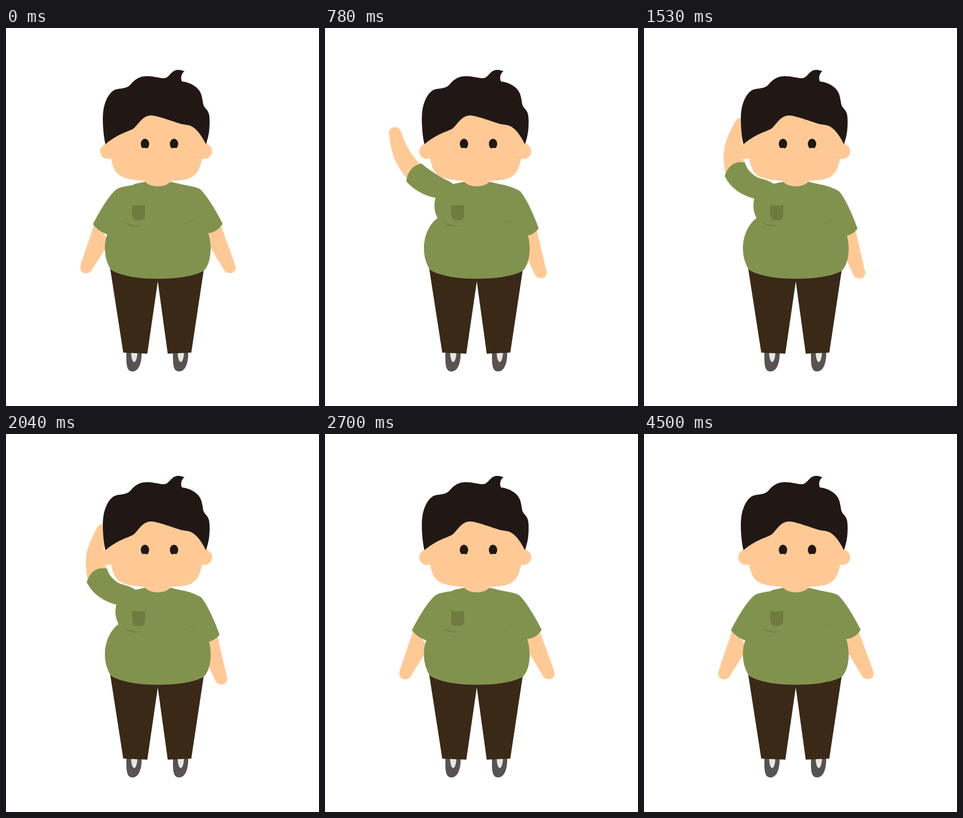
An HTML page without scripts for the animation above (4.53 s loop, 598x722 px).

```html
<!DOCTYPE html>
<html lang="en">
<head>
<meta charset="utf-8">
<title>Scratching his head</title>
<style>
html, body { margin: 0; width: 100%; height: 100%; overflow: hidden; background: #fff; }
svg { display: block; width: 598px; height: 722px; }
.skin { fill: #ffc996; }
.shirt { fill: #81924f; }
.shade { fill: #6f7b41; }
.hair { fill: #211815; }
.pants { fill: #3a2917; }
.shoe { fill: #585350; }
.tongue { fill: #e6e6e4; }

.shoulder, .bend, .eyes { animation: 4.53s linear infinite; }
.shoulder { animation-name: lift; transform-origin: var(--pivot); }
.left { --pivot: 241px 322px; --lift: 87.4deg; }
.right { --pivot: 335px 330px; --lift: 7deg; }

/* the elbow folds once the upper arm is level */
.bend { animation-name: bend; transform-origin: 186px 387px; d: var(--straight); }
.fore {
  --fold: 74deg;
  --straight: path("M172 366C163 392 152 424 143 451C137 472 159 473 165 461C173 447 185 430 197 410Z");
  --bent: path("M163 382C167 418 159 433 140 456C129 468 146 485 157 473C188 443 201 428 206 380Z");
}
.sleeve {
  --fold: 0deg;
  --straight: path("M243 300C228 302 216 304 210 309C195 322 178 351 166 375C176 387 189 395 206 397C216 382 226 366 233 352Z");
  --bent: path("M225 304C209 322 208 333 204 343C198 355 186 365 174 367C169 385 178 400 198 407C222 397 237 375 244 351Z");
}
.eyes { animation-name: blink; transform-origin: 293px 222px; }

@keyframes lift {
  0%, 59.6%, 100% { transform: rotate(0deg); }
  6.62% { transform: rotate(0deg); animation-timing-function: cubic-bezier(.3, 0, .5, 1); }
  19.87% { transform: rotate(var(--lift)); }
  46.36% { transform: rotate(var(--lift)); animation-timing-function: cubic-bezier(.5, 0, .7, 1); }
}
@keyframes bend {
  0%, 12.8%, 53.2%, 100% { d: var(--straight); transform: rotate(0deg); }
  19.87%, 46.36% { d: var(--bent); transform: rotate(var(--fold)); }
  12.8%, 46.36% { animation-timing-function: cubic-bezier(.33, 0, .67, 1); }
}
@keyframes blink {
  0%, 74.17%, 84.1%, 100% { transform: scaleY(1); }
  78.15%, 80.13% { transform: scaleY(.1); }
}
</style>
</head>
<body>
<svg viewBox="0 0 598 722">
  <defs>
    <g id="shoe">
      <path class="shoe" d="M230 618H259C260 636 255 656 242 656C229 656 230 640 230 618Z"/>
      <path class="tongue" d="M239 618H251C251 630 248 638 245 638C241 638 239 628 239 618Z"/>
    </g>
    <g id="eye">
      <ellipse class="hair" cx="265.5" cy="221.5" rx="8" ry="10"/>
      <ellipse class="skin" cx="264.5" cy="233" rx="8" ry="4"/>
    </g>
  </defs>

  <use href="#shoe"/>
  <use href="#shoe" x="89"/>
  <path class="pants" d="M199 459L224 620L270 622L290 484L309 622L354 620L378 461Z"/>

  <g class="shoulder left">
    <path class="skin bend fore"/>
    <path class="shirt bend sleeve"/>
  </g>
  <g class="shoulder right">
    <path class="skin" d="M383 380L391 420L417 463Q420 468 428 468C437 468 441 460 438 453L410 376Z"/>
    <path class="shirt" d="M335 299C351 302 363 303 371 308C384 320 402 350 414 374C408 384 398 391 385 392L360 380Z"/>
  </g>

  <path class="shirt" d="M264 294H316C335 299 352 301 360 306C371 315 371 345 365 363C385 378 391 400 391 421C391 440 386 458 376 465C355 475 325 479 290 479C255 479 225 475 202 463C193 452 189 436 189 421C189 396 200 374 215 363C208 350 208 335 211 325L245 298Z"/>
  <path class="shade" d="M241 338Q253 340 266 338V355C266 364 262 367 254 367C244 367 242 364 241 355Z"/>
  <path class="shade" d="M225 370Q240 378 257 378Q238 382 225 370ZM338 372Q351 371 361 364Q352 373 338 372Z"/>

  <circle class="skin" cx="194.5" cy="235.5" r="14.5"/>
  <circle class="skin" cx="379.5" cy="235.5" r="14.5"/>
  <path class="skin" d="M190 218L201 250C205 270 210 280 226 286C240 290 252 291 264 292C276 306 304 306 316 292C334 291 350 290 359 282C370 274 371 262 375 250L384 218L360 178L277 155L220 185Z"/>
  <path class="hair" d="M190 222C185 200 184 170 186 158C189 137 199 120 211 117C222 115 231 115 237 109C248 96 256 92 270 92C285 92 298 98 306 95C315 90 317 80 329 80C335 80 337 82 341 82C335 88 333 94 336 102C352 104 369 113 373 127C377 140 375 145 380 152C388 160 389 165 389 180C389 196 387 208 382 222C373 204 361 186 345 185C335 184 331 182 318 178C303 173 286 167 277 167C262 167 254 182 245 191C238 197 216 200 190 222Z"/>
  <g class="eyes">
    <use href="#eye"/>
    <use href="#eye" transform="matrix(-1 0 0 1 586.5 0)"/>
  </g>
</svg>
</body>
</html>
```
